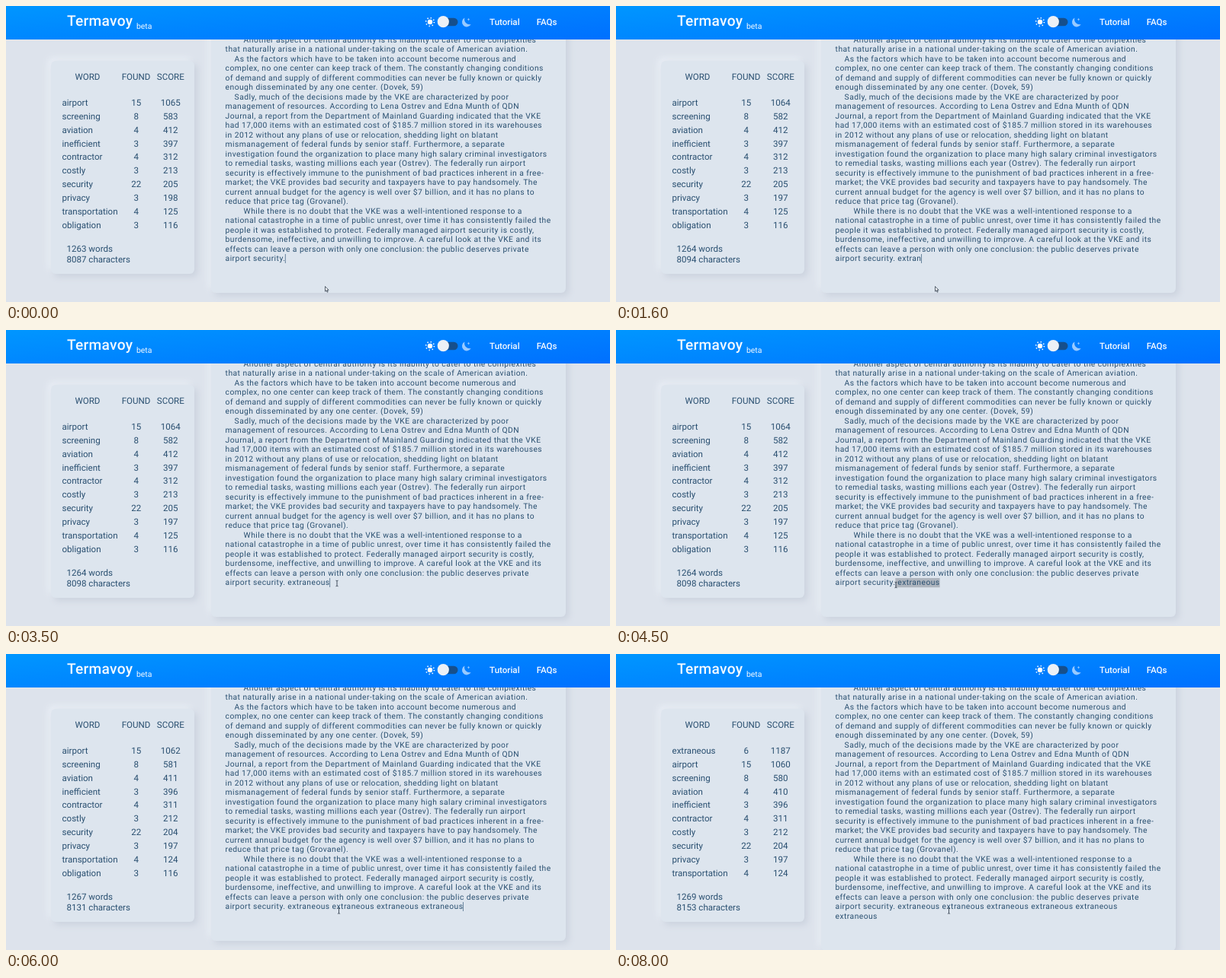
These frames come from a looping animation (792x389 px, 8.1 s). An HTML page:

```html
<!DOCTYPE html>
<html lang="en">
<head>
<meta charset="utf-8">
<title>Termavoy</title>
<style>
  html, body { margin: 0; width: 100%; height: 100%; overflow: hidden; background: #dde3ec; }
  .card {
    position: absolute; border-radius: 6px; background: #dde5ee;
    box-shadow: 4px 4px 8px #cbd2de, -4px -4px 8px #e9eef5;
  }
  #panel { left: 59px; top: 72px; width: 188px; height: 280px; }
  #editor { left: 269px; top: -40px; width: 465px; height: 417px; }
  #bar {
    position: absolute; left: 0; top: 0; width: 792px; height: 44px;
    background: linear-gradient(175deg, #0096ff, #0070ff);
  }
  svg { position: absolute; left: 0; top: 0; }
  text {
    font: 11.57px Roboto, Arial, sans-serif; fill: #294f70;
    white-space: pre; text-rendering: geometricPrecision;
  }
  .prose text { font-size: 10.3px; letter-spacing: .445px; }
  .mid { text-anchor: middle; }
  .nav text { fill: #f4f9ff; font-weight: 500; }
  .nav .brand { font-size: 19.2px; letter-spacing: .25px; }
  .nav .tag { font-size: 10.4px; font-weight: 400; }
</style>
</head>
<body>
<div class="card" id="panel"></div>
<div class="card" id="editor"></div>
<svg width="792" height="389">
  <rect id="mark" y="326" height="12.3" fill="#aeb5be"/>
  <g id="prose" class="prose"></g>
  <rect id="caret" width="1" height="12" fill="#294f70" opacity=".65"/>
  <g id="table"></g>
</svg>
<div id="bar"></div>
<svg width="792" height="389">
  <g class="nav">
    <text class="brand" x="80" y="26">Termavoy</text>
    <text class="tag" x="171" y="30">beta</text>
    <text x="634" y="25">Tutorial</text>
    <text x="695.7" y="25">FAQs</text>
  </g>
  <circle cx="556" cy="21" r="3.2" fill="#fff"/>
  <circle cx="556" cy="21" r="5.4" fill="none" stroke="#fff" stroke-width="1.7" stroke-dasharray="1.3 2.941"/>
  <rect x="567" y="15.8" width="25.5" height="10.4" rx="5.2" fill="#164f8c"/>
  <circle cx="573.3" cy="20.7" r="7.6" fill="#edf1f6"/>
  <path d="M601.5 15.6a6.2 6.2 0 1 0 8.2 8.4a6.6 6.6 0 0 1-8.2-8.4z" fill="#98caff"/>
  <path d="M606.5 16.2v3M605 17.7h3" stroke="#98caff" stroke-width=".8"/>
  <g id="mouse" fill="none" stroke="#34404e">
    <path id="arrow" d="M0 0V6.6L1.6 5.2L2.7 7.7L3.7 7.2L2.6 4.8H4.6z" fill="#f4f6f9" stroke-width=".8"/>
    <path id="beam" d="M-1.5-3.8Q0-3.8 0-2.8V2.8Q0 3.8-1.5 3.8M1.5-3.8Q0-3.8 0-2.8M0 2.8Q0 3.8 1.5 3.8" stroke-width=".9"/>
  </g>
</svg>
<script>
const LOOP = 8100, STEP = 100, LEFT = 287.6, PITCH = 12.5, BASE = 47.7;
const WORD = ' extraneous', END = 'airport security.';
const KEYS = { start: 300, gap: 205 };
const PASTES = [5200, 5500, 5800, 6100, 6400];
const DRAG = [3600, 5000], LISTED = 7300;

const PROSE = `        Another aspect of central authority is its inability to cater to the complexities
that naturally arise in a national under-taking on the scale of American aviation.
    As the factors which have to be taken into account become numerous and
complex, no one center can keep track of them. The constantly changing conditions
of demand and supply of different commodities can never be fully known or quickly
enough disseminated by any one center. (Dovek, 59)
    Sadly, much of the decisions made by the VKE are characterized by poor
management of resources. According to Lena Ostrev and Edna Munth of QDN
Journal, a report from the Department of Mainland Guarding indicated that the VKE
had 17,000 items with an estimated cost of $185.7 million stored in its warehouses
in 2012 without any plans of use or relocation, shedding light on blatant
mismanagement of federal funds by senior staff. Furthermore, a separate
investigation found the organization to place many high salary criminal investigators
to remedial tasks, wasting millions each year (Ostrev). The federally run airport
security is effectively immune to the punishment of bad practices inherent in a free-
market; the VKE provides bad security and taxpayers have to pay handsomely. The
current annual budget for the agency is well over $7 billion, and it has no plans to
reduce that price tag (Grovanel).
        While there is no doubt that the VKE was a well-intentioned response to a
national catastrophe in a time of public unrest, over time it has consistently failed the
people it was established to protect. Federally managed airport security is costly,
burdensome, ineffective, and unwilling to improve. A careful look at the VKE and its
effects can leave a person with only one conclusion: the public deserves private`.split('\n');

// word, times found, score at 1263 words
const WORDS = [
  ['airport', 15, 1065], ['screening', 8, 582.7], ['aviation', 4, 412.3],
  ['inefficient', 3, 397.45], ['contractor', 4, 312.2], ['costly', 3, 213],
  ['security', 22, 205], ['privacy', 3, 197.6], ['transportation', 4, 124.8],
  ['obligation', 3, 116.2]
];
const EXTRA = ['extraneous', 6, 1192.6];

// time, x, y of the pointer
const PATH = [
  [0, 418.5, 368.5], [2800, 418.5, 368.5], [3400, 434, 333], [3600, 434, 333],
  [4400, 367, 335], [4600, 367, 335], [5000, 436.5, 337.5], [LOOP, 436.5, 337.5]
];

const $ = id => document.getElementById(id);

function addText(parent, x, y, str = '', cls = '') {
  const el = document.createElementNS('http://www.w3.org/2000/svg', 'text');
  el.setAttribute('x', x);
  el.setAttribute('y', y);
  el.setAttribute('class', cls);
  el.textContent = str;
  parent.append(el);
  return el;
}

function setText(el, str) {
  if (el.textContent !== str) el.textContent = str;
}

function show(el, on) {
  el.style.display = on ? '' : 'none';
}

const prose = $('prose'), table = $('table');
const lineY = i => BASE + i * PITCH;
PROSE.forEach((line, i) => addText(prose, LEFT, lineY(i), line));
const last = addText(prose, LEFT, lineY(PROSE.length));
const wrap = addText(prose, LEFT, lineY(PROSE.length + 1));

[['WORD', 107], ['FOUND', 170.5], ['SCORE', 215.8]].forEach(([s, x]) => addText(table, x, 97, s, 'mid'));
const rows = WORDS.map((_, i) => {
  const y = 130.8 + i * 17.9;
  return [addText(table, 73.5, y), addText(table, 170.7, y, '', 'mid'), addText(table, 215.8, y, '', 'mid')];
});
const wordCount = addText(table, 79.5, 323);
const charCount = addText(table, 79.5, 337);

function pointer(t) {
  const i = Math.max(1, PATH.findIndex(p => p[0] > t));
  const [t0, x0, y0] = PATH[i - 1], [t1, x1, y1] = PATH[i];
  const u = (t - t0) / (t1 - t0), e = u * u * (3 - 2 * u);
  return [x0 + (x1 - x0) * e, y0 + (y1 - y0) * e];
}

const charEnd = n => last.getEndPositionOfChar(n - 1).x;

function draw(t) {
  const typed = Math.max(0, Math.min(WORD.length, Math.floor((t - KEYS.start) / KEYS.gap) + 1));
  const pasted = PASTES.filter(p => p <= t).length;
  const wrapped = pasted > 4;
  setText(last, END + WORD.slice(0, typed) + WORD.repeat(Math.min(pasted, 4)));
  setText(wrap, wrapped ? WORD.trim() : '');
  $('editor').style.height = 417 + (wrapped ? PITCH : 0) + 'px';

  const words = 1263 + (typed > 1) + pasted;
  setText(wordCount, words + ' words');
  setText(charCount, 8087 + typed + pasted * WORD.length + ' characters');
  const list = t >= LISTED ? [EXTRA, ...WORDS] : WORDS;
  rows.forEach((cells, i) => {
    const [word, found, score] = list[i];
    [word, found, Math.round(score * 1263 / words)].forEach((v, k) => setText(cells[k], String(v)));
  });

  const [mx, my] = pointer(t);
  $('mouse').setAttribute('transform', `translate(${mx} ${my})`);
  show($('beam'), my < 358);
  show($('arrow'), my >= 358);

  // selection grows left from the end of the typed word
  const dragging = t >= DRAG[0] && t < DRAG[1];
  const full = END.length + WORD.length;
  let from = full;
  if (dragging) {
    const reach = t > 4400 ? 0 : mx;
    while (from > END.length && charEnd(from - 1) >= reach - 2) from--;
  }
  const selected = dragging && from < full;
  show($('mark'), selected);
  if (selected) {
    $('mark').setAttribute('x', charEnd(from));
    $('mark').setAttribute('width', charEnd(full) - charEnd(from));
  }

  const keyTimes = Array.from({ length: typed }, (_, i) => KEYS.start + i * KEYS.gap);
  const edits = [0, ...keyTimes, DRAG[1], ...PASTES].filter(e => e <= t);
  const idle = t - Math.max(...edits);
  show($('caret'), !selected && idle % 1000 < 500);
  const x = wrapped ? wrap.getEndPositionOfChar(WORD.length - 2).x : charEnd(last.textContent.length);
  $('caret').setAttribute('x', x - .5);
  $('caret').setAttribute('y', 326 + (wrapped ? PITCH : 0));
}

const began = performance.now();
function tick() {
  const t = (performance.now() - began) % LOOP;
  draw(Math.floor(t / STEP) * STEP);
  requestAnimationFrame(tick);
}
tick();
</script>
</body>
</html>
```
